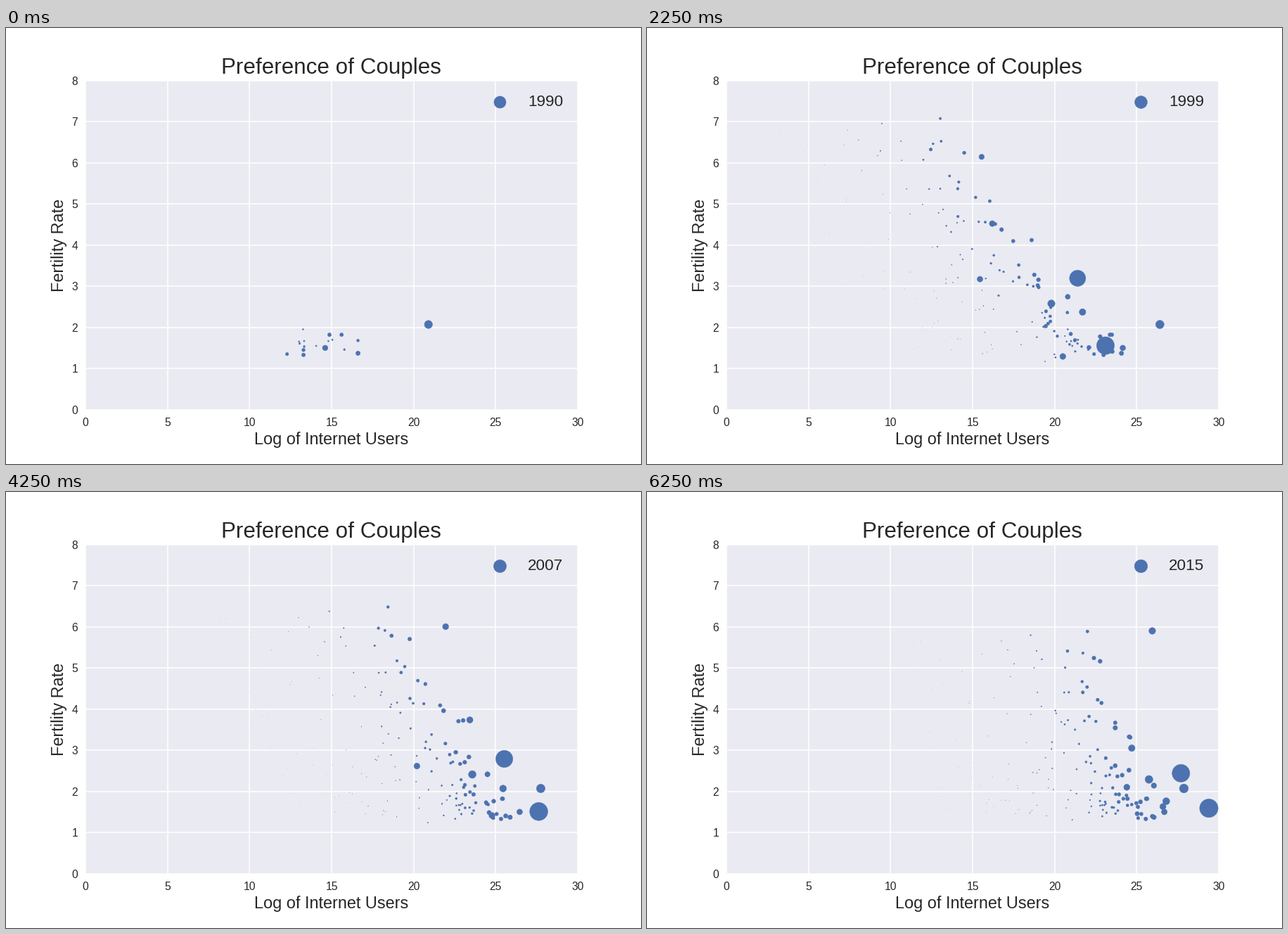
Recreate the animation shown at these times as a matplotlib script. Size 903 px wide and 620 px high, loop 6500 ms.

```python
import numpy as np
import matplotlib.pyplot as plt
from matplotlib.animation import FuncAnimation

W, H, DPI = 903, 620, 112.875
BLUE, PANEL, INK = "#4C72B0", "#EAEAF2", "#262626"
FIRST, LAST = 1990, 2015
AREA = 0.205  # marker area in square points per million people

# Emerging giants: millions of people, log2 of users and fertility at key years.
X_KEYS, F_KEYS = (1994, 1999, 2003, 2011, 2015), (1994, 2001, 2015)
emerging = {
    "China": (1288, (13.8, 23.1, 26.3, 28.95, 29.4), (1.82, 1.45, 1.59)),
    "India": (1118, (13.3, 21.4, 24.15, 26.9, 27.7), (3.55, 3.05, 2.44)),
    "Indonesia": (223, (11, 19.8, 22.3, 24.85, 25.75), (2.77, 2.5, 2.29)),
    "Brazil": (182, (15.9, 21.7, 24.5, 26.4, 26.8), (2.55, 2.3, 1.76)),
    "Pakistan": (150, (8, 16.2, 22.9, 23.95, 24.7), (5.2, 4.25, 3.05)),
    "Russia": (145, (16.3, 20.5, 23.5, 26.05, 26.6), (1.4, 1.25, 1.63)),
    "Bangladesh": (138, (2, 15.45, 17.75, 22.65, 24.4), (3.6, 3.0, 2.1)),
    "Nigeria": (131, (8, 15.55, 19.5, 24.4, 25.95), (6.3, 6.08, 5.9)),
    "Mexico": (105, (15.25, 20.8, 23.65, 25.35, 26.05), (3.05, 2.62, 2.14)),
}
# Early adopters: millions of people, thousands of users in 1990, fertility.
pioneers = {
    "USA": (290, 1960, 2.07), "Japan": (127, 25, 1.5), "Germany": (82, 100, 1.37),
    "France": (61, 30, 1.82), "UK": (59, 50, 1.82), "Italy": (58, 10, 1.33),
    "South Korea": (48, 10, 1.45), "Spain": (42, 5, 1.35), "Canada": (32, 100, 1.68),
}


def along(keys, vals, t):
    """Linear interpolation that also runs on below the first key."""
    if t < keys[0]:
        return vals[0] + (vals[1] - vals[0]) * (t - keys[0]) / (keys[1] - keys[0])
    return np.interp(t, keys, vals)


rng = np.random.default_rng(8)

# A few small early adopters join the listed ones.
p_pop, p_users, p_fert = np.array(list(pioneers.values())).T
p_pop = np.append(p_pop, rng.uniform(4, 18, 10))
p_first = np.append(np.log2(p_users * 1e3), rng.uniform(12.2, 16.6, 10))
p_fert = np.append(p_fert, rng.uniform(1.45, 2.0, 10))
p_last = np.log2(p_pop * 0.85e6)

# Everyone else: poverty sets fertility, online share and start year.
N = 158
poverty = rng.uniform(0, 1, N)
s_pop = 75 * rng.permutation((np.arange(N) + 0.5) / N) ** 5 + 0.02
s_last = np.log2(s_pop * 1e6) - 0.25 - 2.9 * poverty + rng.normal(0, 0.3, N)
s_fert = 1.3 + 4.4 * poverty ** 1.8 + np.abs(rng.normal(0, 0.22, N))
s_drop = 2.2 + 6.8 * poverty + rng.normal(0, 0.5, N)
s_bend = 3 - 1.7 * poverty
s_decline = -0.12 + 0.42 * np.minimum(1, 3 * poverty) - 0.1 * poverty
s_start = 1991 + 6 * np.sqrt(poverty) + rng.uniform(-1.2, 1.2, N)


def state(t):
    """Positions and areas of the countries online in year t, and the key's area."""
    left = LAST - t
    big = list(emerging.values())
    groups = [
        (np.array([r[0] for r in big]),
         np.array([along(X_KEYS, r[1], t) for r in big]),
         np.array([along(F_KEYS, r[2], t) for r in big]), 1992, 10),
        (p_pop, p_last - (p_last - p_first) * (left / 25) ** 3.5, p_fert, FIRST, 0),
        (s_pop, s_last - s_drop * (left / 16) ** s_bend,
         s_fert * (1 + s_decline * left / 16), s_start, 3),
    ]
    pop, x, f = (np.concatenate([g[k] for g in groups]) for k in range(3))
    on = np.concatenate([(g[3] <= t) & (g[1] > g[4]) & (g[2] < 7.8) for g in groups])
    pop = pop * (1 + (0.004 + 0.006 * (f - 1.4)) * (t - 2003))
    return np.column_stack([x, f])[on], AREA * pop[on], AREA * pop.max() / 2


plt.rcParams["font.family"] = "Liberation Sans"
fig = plt.figure(figsize=(8, 5.493), dpi=DPI, facecolor="white")
ax = fig.add_axes([113 / W, 1 - 542.7 / H, 700 / W, 468.1 / H], facecolor=PANEL)
ax.set(xlim=(0, 30), ylim=(0, 8), xticks=range(0, 31, 5), yticks=range(9))
ax.set_axisbelow(True)
ax.grid(color="white", lw=1, ls="-")
ax.tick_params(length=0, pad=7, labelsize=10, labelcolor=INK)
for spine in ax.spines.values():
    spine.set_visible(False)


def write(px, py, s, size, **kw):
    return fig.text(px / W, 1 - py / H, s, fontsize=size, color=INK, va="baseline", **kw)


write(462.8, 65, "Preference of Couples", 20, ha="center")
write(462.8, 592, "Log of Internet Users", 15, ha="center")
write(82, 308.5, "Fertility Rate", 15, ha="center", rotation=90, rotation_mode="anchor")

dots = ax.scatter([], [], c=BLUE, linewidths=0.3, edgecolors=BLUE)
key_dot = ax.scatter([25.25], [7.487], c=BLUE, linewidths=0.3, edgecolors=BLUE)
key_text = write(741.8, 110.7, "", 14.4, ha="left")


def update(i):
    year = FIRST + i
    spots, areas, key_area = state(year)
    dots.set_offsets(spots)
    dots.set_sizes(areas)
    # a kerned "11" makes the right-aligned key narrower
    shift = 1.6 if "11" in str(year) else 0
    key_dot.set_offsets([(25.25 + shift * 30 / 700, 7.487)])
    key_dot.set_sizes([key_area])
    key_text.set_text(str(year))
    key_text.set_x((741.8 + shift) / W)
    return dots, key_dot, key_text


anim = FuncAnimation(fig, update, frames=LAST - FIRST + 1, interval=250,
                     repeat=True, repeat_delay=0, blit=False)
plt.show()
```
